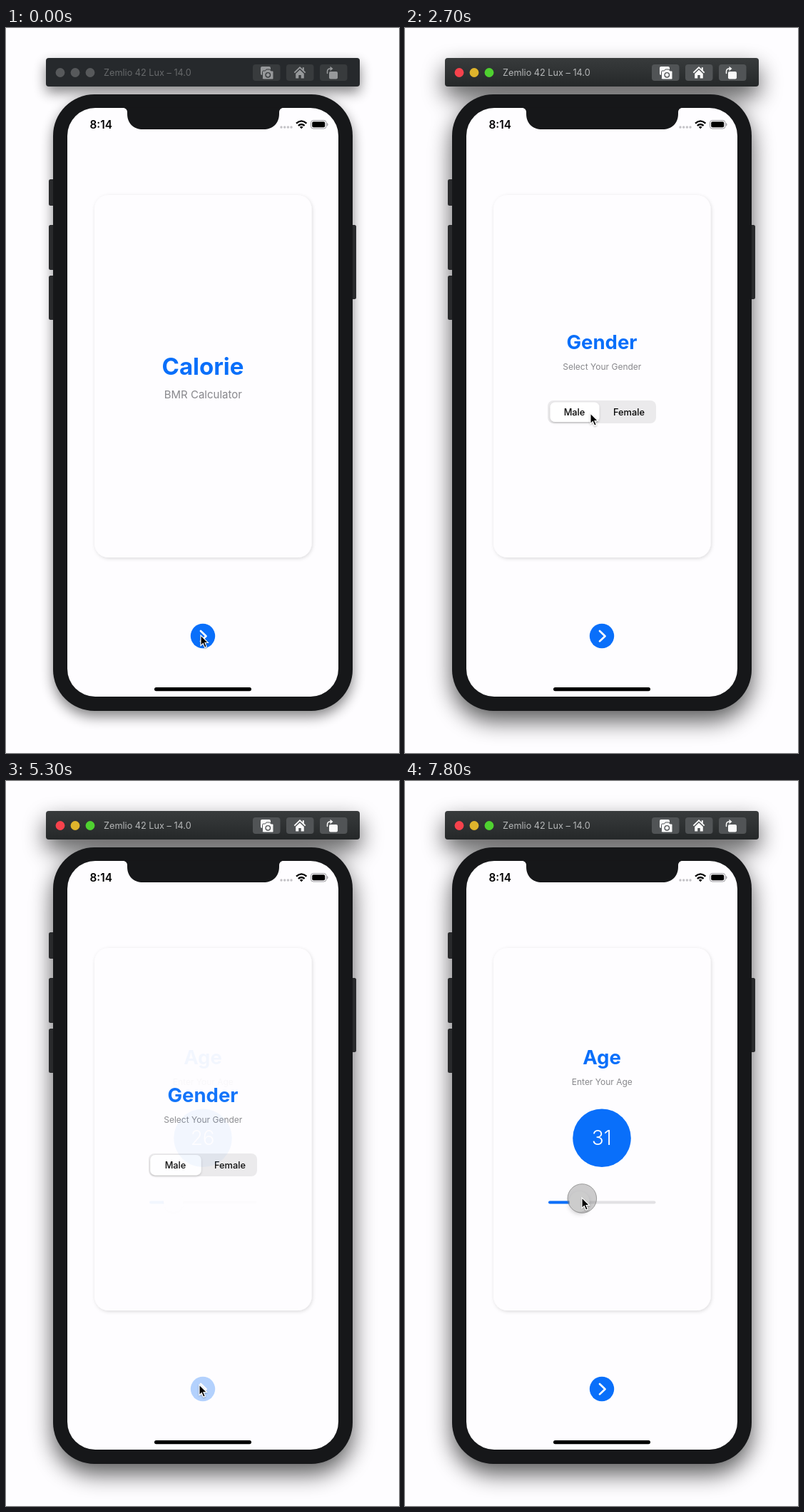
Recreate the animation shown at these times as an HTML page. Size 551 px wide and 1016 px high, loop 8000 ms.

```html
<!DOCTYPE html>
<html lang="en">
<head>
<meta charset="utf-8">
<title>Calorie</title>
<style>
  html, body { margin: 0; width: 100%; height: 100%; overflow: hidden; background: #fefdff; }
  svg { display: block; width: 100vw; height: 100vh; }
  text { font-family: Inter, Roboto, sans-serif; }
  .mid { text-anchor: middle; }
  .title { font-weight: 700; fill: #096ffa; text-anchor: middle; }
  .note { fill: #88888c; text-anchor: middle; }
  .seg { font-size: 12.8px; font-weight: 500; fill: #050505; text-anchor: middle; }
  .blue { fill: #096ffa; }
  .line { fill: none; stroke-linecap: round; stroke-linejoin: round; }
</style>
</head>
<body>
<svg viewBox="0 0 551 1016" preserveAspectRatio="none">
  <defs>
    <linearGradient id="bar" x2="0" y2="1">
      <stop offset="0" stop-color="#383b3c"/>
      <stop offset="1" stop-color="#252829"/>
    </linearGradient>
    <filter id="wide" filterUnits="userSpaceOnUse" x="-60" y="-40" width="680" height="1130"><feGaussianBlur stdDeviation="16"/></filter>
    <filter id="tight" filterUnits="userSpaceOnUse" x="-60" y="-40" width="680" height="1130"><feGaussianBlur stdDeviation="9"/></filter>
    <filter id="cardShade" x="-10%" y="-10%" width="120%" height="120%"><feDropShadow dx="1" dy="1.5" stdDeviation="2.6" flood-opacity=".14"/></filter>
    <filter id="pillShade" x="-20%" y="-40%" width="140%" height="200%"><feDropShadow dx="0" dy="1.5" stdDeviation="1.5" flood-opacity=".2"/></filter>
    <filter id="thumbShade" x="-60%" y="-60%" width="220%" height="240%"><feDropShadow dx="0" dy="3" stdDeviation="3" flood-opacity=".2"/></filter>
    <filter id="arrowShade" x="-60%" y="-40%" width="240%" height="200%"><feDropShadow dx="0" dy="1" stdDeviation=".8" flood-opacity=".3"/></filter>
    <g id="window">
      <rect x="56" y="42" width="440" height="40" rx="4"/>
      <rect x="66" y="93" width="420" height="864" rx="58"/>
    </g>
  </defs>

  <rect width="551" height="1016" fill="#fefdff"/>
  <use id="farShade" href="#window" y="14" filter="url(#wide)" opacity=".65"/>
  <use id="nearShade" href="#window" y="8" filter="url(#tight)" opacity=".48"/>

  <!-- toolbar -->
  <rect id="toolbar" x="56" y="42" width="440" height="40" rx="4"/>
  <g id="lights">
    <circle cx="76" cy="62.5" r="6.4"/>
    <circle cx="97" cy="62.5" r="6.4"/>
    <circle cx="118" cy="62.5" r="6.4"/>
  </g>
  <text id="device" x="137" y="67" font-size="12.7">Zemlio 42 Lux – 14.0</text>
  <g id="keys">
    <rect x="346" y="51" width="38.500" height="23" rx="4"/>
    <rect x="393" y="51" width="38.500" height="23" rx="4"/>
    <rect x="440" y="51" width="38.500" height="23" rx="4"/>
  </g>
  <g id="icons">
    <rect x="357" y="54" width="14" height="12" rx="2"/>
    <path id="camera" d="M361 60h2.500l1.500-2h5l1.500 2h2q1.500 0 1.500 1.500v9q0 1.500-1.500 1.500h-12.500q-1.500 0-1.500-1.500v-9q0-1.500 1.500-1.500z"/>
    <circle id="lens" cx="367.300" cy="65.800" r="3.200"/>
    <path d="M412 54l8.300 8-1.300 1.300-7-6.700-7 6.700-1.300-1.300z"/>
    <path d="M412 58.500l5.800 5.500v6.500h-4.100v-4.500h-3.400v4.500h-4.100v-6.500z"/>
    <rect x="415.800" y="55.200" width="2" height="4.500"/>
    <rect x="453" y="61" width="12" height="10.500" rx="2"/>
    <path d="M454.500 53.800l4 3.200-4 3.200z"/>
    <path id="turn" class="line" d="M450.500 63.500v-2.500q0-4 4-4" stroke-width="1.500"/>
  </g>

  <!-- handset -->
  <g fill="#292a2c">
    <rect x="60" y="212" width="12" height="37" rx="2.500"/>
    <rect x="60" y="276" width="12" height="63" rx="2.500"/>
    <rect x="60" y="347" width="12" height="62" rx="2.500"/>
    <rect x="479" y="276" width="12" height="104" rx="2.500"/>
  </g>
  <rect x="66" y="93" width="420" height="864" rx="58" fill="#161719"/>
  <rect x="86" y="112" width="380" height="825" rx="39" fill="#fefdff"/>
  <path d="M163 111.500q7 .5 7 7v1.500c0 14 9 22 22 22H361c13 0 22-8 22-22v-1.500q0-6.500 7-7z" fill="#161719"/>
  <text x="117.500" y="141" font-size="15.300" font-weight="600">8:14</text>
  <g fill="#c3c2c6">
    <circle cx="386" cy="139" r="1.700"/><circle cx="390.700" cy="139" r="1.700"/>
    <circle cx="395.400" cy="139" r="1.700"/><circle cx="400" cy="139" r="1.700"/>
  </g>
  <g fill="none" stroke="#000" stroke-width="2.300">
    <path d="M407 133.700q7.200-6.600 14.400 0"/>
    <path d="M409.800 136.900q4.400-3.900 8.800 0"/>
  </g>
  <path d="M411.800 138.700q2.400-1.900 4.800 0l-2.400 2.500z"/>
  <rect x="427.500" y="129.500" width="21.500" height="11.500" rx="3.300" fill="none" stroke="#9c9ba0"/>
  <rect x="429.200" y="131.200" width="18" height="8" rx="1.900"/>
  <path d="M450.300 133.300q2 2 0 4z" fill="#9c9ba0" stroke="#9c9ba0" stroke-width=".6"/>
  <rect x="208" y="924" width="136" height="5.200" rx="2.600"/>

  <rect x="124" y="234" width="304.500" height="508" rx="20" fill="#fefdff" filter="url(#cardShade)"/>

  <g id="welcome">
    <text class="title" x="276" y="486" font-size="33">Calorie</text>
    <text class="note" x="276.300" y="519" font-size="15">BMR Calculator</text>
  </g>

  <g id="gender">
    <text class="title" x="276" y="450" font-size="27.500">Gender</text>
    <text class="note" x="276.300" y="479" font-size="12">Select Your Gender</text>
    <rect x="200" y="522" width="152" height="32" rx="8" fill="#ebeaec"/>
    <g id="pill"><rect x="-35.700" y="-14.200" width="71.400" height="28.400" rx="7" fill="#fff" filter="url(#pillShade)"/></g>
    <text class="seg" x="237.500" y="543">Male</text>
    <text class="seg" x="314" y="543">Female</text>
  </g>

  <g id="age">
    <text class="title" x="276" y="397" font-size="27.500">Age</text>
    <text class="note" x="276.300" y="426" font-size="12">Enter Your Age</text>
    <circle class="blue" cx="276" cy="500.300" r="40.800"/>
    <text id="years" class="mid" x="275.700" y="510.300" font-size="28" font-weight="300" fill="#fff"></text>
    <rect x="201" y="588.500" width="150.500" height="4" rx="2" fill="#e2e1e4"/>
    <rect id="fill" class="blue" x="201" y="588.500" height="4" rx="2"/>
    <circle id="thumb" cy="589.500" r="14" fill="#fff" filter="url(#thumbShade)"/>
  </g>

  <g id="next">
    <circle class="blue" cx="276" cy="852" r="17.200"/>
    <path class="line" d="M273 845l7.500 7.200-7.500 7.200" stroke="#fff" stroke-width="2.700"/>
  </g>

  <circle id="touch" r="20.300" fill="#808080" fill-opacity=".4" stroke="#808080" stroke-opacity=".75"/>
  <path id="arrow" d="M0 0V14.600L3.300 11.500L5.700 17.200L8.300 16.100L5.900 10.500H10.500Z" stroke="#fff" stroke-width="1.100" filter="url(#arrowShade)"/>
</svg>
<script>
const LOOP = 8000, STEP = 100, WAKE = 800;
const $ = id => document.getElementById(id);
const set = (id, attrs) => {
  for (const key in attrs) $(id).setAttribute(key, attrs[key]);
};

// smooth 0..1 between two times
const ramp = (t, from, to) => {
  const u = Math.min(1, Math.max(0, (t - from) / (to - from)));
  return u * u * (3 - 2 * u);
};

// pointer stops: time, x, y
const route = [
  [0, 273, 851], [1700, 273, 851], [2500, 260, 540], [3100, 260, 540],
  [3400, 291, 540], [3750, 291, 540], [4000, 224, 540], [4200, 224, 540],
  [4640, 270, 842], [4900, 271, 846], [5830, 271, 846], [6180, 239, 584],
  [6700, 239, 584], [7400, 248, 584], [LOOP, 248, 584]
];
const nextTaps = [[800, 1000], [5000, 5300]];
const segTaps = [[2600, 2700], [3500, 3600], [4000, 4100]];
const presses = [...nextTaps, ...segTaps, [6300, LOOP]];

function pointerAt(t) {
  const i = route.findIndex(stop => stop[0] > t);
  const [t0, x0, y0] = route[i - 1], [t1, x1, y1] = route[i];
  const k = ramp(t, t0, t1);
  return [x0 + (x1 - x0) * k, y0 + (y1 - y0) * k];
}

// 1 while a tap is held, easing back to 0 after release
const held = (taps, t, back) => Math.max(...taps.map(([a, b]) => t < a ? 0 : 1 - ramp(t, b, b + back)));

function drawWindow(awake) {
  const key = awake ? '#515456' : '#383b3d';
  const ink = awake ? '#fafafa' : '#97999b';
  const lights = awake ? ['#f6424c', '#dfb42c', '#4fd130'] : Array(3).fill('#57595b');
  set('farShade', { display: awake ? 'inline' : 'none' });
  set('nearShade', { display: awake ? 'none' : 'inline' });
  set('toolbar', { fill: awake ? 'url(#bar)' : '#26292c' });
  set('device', { fill: awake ? '#b5b7b8' : '#67696b' });
  set('keys', { fill: key });
  set('icons', { fill: ink });
  set('camera', { stroke: key });
  set('lens', { fill: ink, stroke: key, 'stroke-width': 1.4 });
  set('turn', { stroke: ink });
  [...$('lights').children].forEach((dot, i) => dot.setAttribute('fill', lights[i]));
}

function draw(t) {
  drawWindow(t >= WAKE);

  const toGender = ramp(t, 950, 1350), toAge = ramp(t, 5250, 5650);
  set('welcome', { opacity: 1 - toGender });
  set('gender', { opacity: toGender * (1 - toAge) });
  set('age', { opacity: toAge });

  const slide = 76.4 * (ramp(t, 3450, 3850) - ramp(t, 4050, 4450));
  const scale = 1 - 0.035 * held(segTaps, t, 250);
  set('pill', { transform: `translate(${238 + slide} 538.2) scale(${scale})` });

  const thumb = 235 + 9.4 * ramp(t, 6700, 7400);
  set('thumb', { cx: thumb });
  set('fill', { width: thumb - 201 });
  $('years').textContent = Math.round(15 + (thumb - 215) / 122 * 65);

  set('next', { opacity: 1 - 0.7 * held(nextTaps, t, 250) });

  const [x, y] = pointerAt(t);
  const down = presses.some(([a, b]) => t >= a && t < b);
  set('arrow', { transform: `translate(${x} ${y})` });
  set('touch', { cx: x + 0.3, cy: y + 1, display: down ? 'inline' : 'none' });
}

function tick() {
  const t = performance.now() % LOOP;
  draw(Math.floor(t / STEP) * STEP);
  requestAnimationFrame(tick);
}
tick();
</script>
</body>
</html>
```
